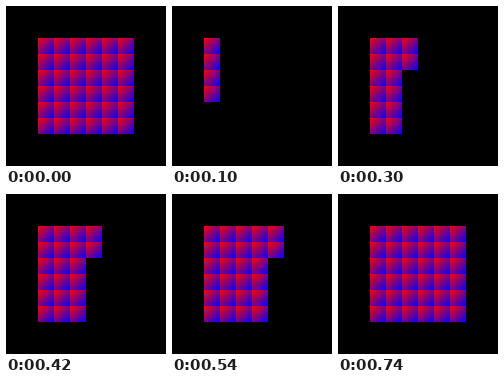
These frames come from a looping animation (160 px wide and 160 px high, 780 ms). An HTML page:

```html
<!DOCTYPE html>
<html lang="en">
<head>
<meta charset="utf-8">
<title>Gradient tiles</title>
<style>
  html, body { margin: 0; width: 100%; height: 100%; overflow: hidden; background: #000; }
  svg { display: block; width: 100vw; height: 100vh; }
</style>
</head>
<body>
<svg viewBox="0 0 160 160">
  <defs>
    <linearGradient id="fade" x1="0" y1="0" x2="1" y2="1">
      <stop offset="0" stop-color="#f00"/>
      <stop offset="1" stop-color="#00f"/>
    </linearGradient>
  </defs>
  <rect width="160" height="160" fill="#000"/>
  <g id="grid" fill="url(#fade)" shape-rendering="crispEdges"></g>
</svg>
<script>
const LOOP = 780, STEP = 20, SIDE = 6, SIZE = 16, ORIGIN = 32;
const COUNT = SIDE * SIDE;
const grid = document.getElementById('grid');

// Tiles run down each column, then on to the next column.
const tiles = Array.from({ length: COUNT }, (_, i) => {
  const tile = document.createElementNS('http://www.w3.org/2000/svg', 'rect');
  tile.setAttribute('x', ORIGIN + Math.floor(i / SIDE) * SIZE);
  tile.setAttribute('y', ORIGIN + (i % SIDE) * SIZE);
  tile.setAttribute('width', SIZE);
  tile.setAttribute('height', SIZE);
  return grid.appendChild(tile);
});

// The full grid shows first, clears, then fills one tile per step.
function visibleCount(t) {
  const step = Math.floor(t / STEP);
  return step === 0 ? COUNT : Math.min(step - 1, COUNT);
}

function draw(t) {
  const n = visibleCount(t);
  tiles.forEach((tile, i) => tile.setAttribute('visibility', i < n ? 'visible' : 'hidden'));
}

let start;
function tick(now) {
  start ??= now;
  draw(Math.max(0, now - start) % LOOP);
  requestAnimationFrame(tick);
}
draw(0);
requestAnimationFrame(tick);
</script>
</body>
</html>
```
